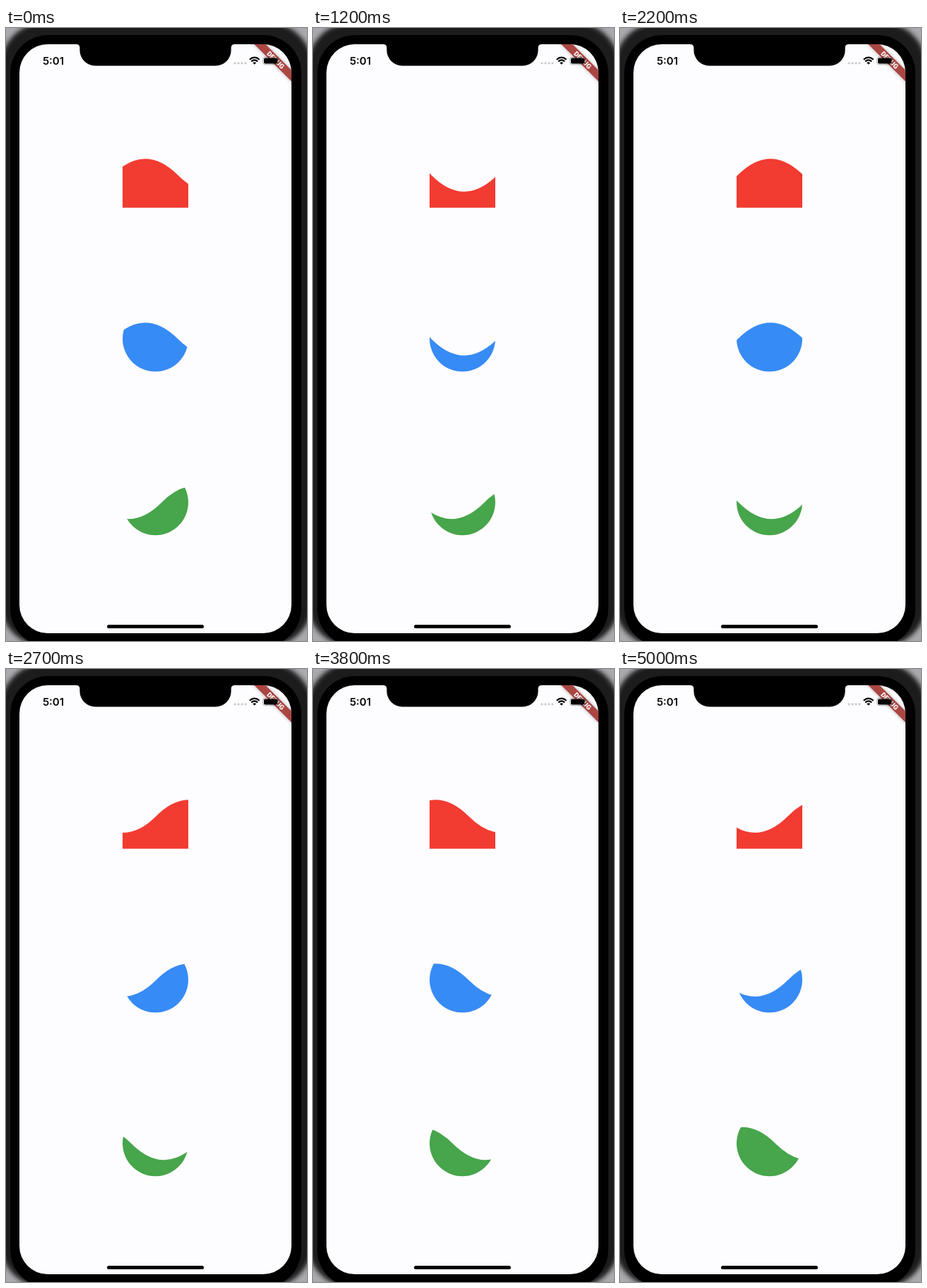
These frames come from a looping animation (426x868 px, 5.1 s). An HTML page:

```html
<!DOCTYPE html>
<html lang="en">
<head>
<meta charset="utf-8">
<title>Wave shapes</title>
<style>
  html, body { margin: 0; width: 100%; height: 100%; overflow: hidden; background: #aaaaae; }
  svg { display: block; width: 426px; height: 868px; }
</style>
</head>
<body>
<svg viewBox="0 0 426 868" xmlns="http://www.w3.org/2000/svg">
  <defs>
    <clipPath id="screen"><rect x="19" y="23" width="385" height="834" rx="40"/></clipPath>
    <clipPath id="square"><rect x="165" y="161.5" width="93" height="93"/></clipPath>
    <clipPath id="discA"><circle cx="211.5" cy="440" r="46.5"/></clipPath>
    <clipPath id="discB"><circle cx="211.5" cy="671.7" r="46.5"/></clipPath>
    <filter id="blur" x="-50%" y="-50%" width="200%" height="200%"><feGaussianBlur stdDeviation="2.6"/></filter>
    <filter id="soft" x="-10%" y="-10%" width="120%" height="120%"><feGaussianBlur stdDeviation="3"/></filter>
  </defs>

  <!-- phone body -->
  <rect x="-8" y="-8" width="442" height="884" rx="64" fill="#1b1b1b" filter="url(#soft)"/>
  <rect x="6" y="10" width="412" height="866" rx="54" fill="#000"/>
  <rect x="19" y="23" width="385" height="834" rx="40" fill="#fdfcff"/>

  <g clip-path="url(#screen)">
    <g transform="translate(404 23) rotate(45)">
      <rect x="-60" y="26" width="120" height="11.2" fill="#000" opacity=".32" filter="url(#blur)"/>
      <rect x="-60" y="26" width="120" height="11.2" fill="#ab4642"/>
      <text x="0" y="35" text-anchor="middle" fill="#fff" font-family="Roboto, sans-serif" font-weight="900" font-size="9.5">DEBUG</text>
    </g>
  </g>
  <path d="M99 22V23Q104.4 23 104.4 28V31.4A22 22 0 0 0 126.4 53.4H296.6A22 22 0 0 0 318.6 31.4V28Q318.6 23 324 23V22Z" fill="#000"/>

  <!-- status bar -->
  <text x="67" y="52" text-anchor="middle" font-family="Inter, sans-serif" font-weight="600" font-size="15" fill="#050505">5:01</text>
  <g fill="#c8c8cc">
    <circle cx="324" cy="49.8" r="1.6"/><circle cx="329" cy="49.8" r="1.6"/>
    <circle cx="334" cy="49.8" r="1.6"/><circle cx="339" cy="49.8" r="1.6"/>
  </g>
  <g fill="none" stroke="#000" stroke-width="2.2">
    <path d="M344.8 44.8Q351.7 38.6 358.6 44.8"/>
    <path d="M347.2 47.4Q351.7 43.4 356.2 47.4"/>
  </g>
  <path d="M349.3 49.3Q351.7 47.2 354.1 49.3L351.7 51.8Z" fill="#000"/>
  <rect x="363.7" y="41.2" width="22" height="10.6" rx="3" fill="none" stroke="#000" stroke-opacity=".35" stroke-width=".9"/>
  <rect x="365" y="42.5" width="19.4" height="8" rx="1.8" fill="#000"/>
  <path d="M387 44.7Q388.6 46.5 387 48.3Z" fill="#000" opacity=".4"/>

  <path id="red" clip-path="url(#square)" fill="#f23b31"/>
  <path id="blue" clip-path="url(#discA)" fill="#378bf5"/>
  <path id="green" clip-path="url(#discB)" fill="#47a54b"/>

  <rect x="143" y="845" width="137" height="5" rx="2.5" fill="#000"/>
</svg>
<script>
  const LOOP = 5100, STEP = 100;
  const LEFT = 165, SIZE = 93, HALF = SIZE / 2, WAVE = SIZE * 2;

  // Speeds in px per second; crest is the offset from the left edge at time 0.
  const shapes = [
    { id: "red", mid: 208.4, crest: 32, speed: 91.8 },
    { id: "blue", mid: 440.4, crest: 32, speed: 91.8 },
    { id: "green", mid: 671.9, crest: 101.6, speed: 18.6 }
  ].map(s => ({ ...s, el: document.getElementById(s.id) }));

  function wavePath(mid, crest) {
    const start = LEFT + crest % WAVE - HALF - WAVE;
    const arcs = `q${HALF} ${-HALF} ${SIZE} 0q${HALF} ${HALF} ${SIZE} 0`.repeat(3);
    return `M${start} ${mid}${arcs}v${SIZE}H${start}Z`;
  }

  function draw(ms) {
    const sec = Math.floor(ms / STEP) * STEP / 1000;
    for (const s of shapes) {
      s.el.setAttribute("d", wavePath(s.mid, s.crest + s.speed * sec));
    }
  }

  const origin = performance.now();
  function tick() {
    draw((performance.now() - origin) % LOOP);
    requestAnimationFrame(tick);
  }
  tick();
</script>
</body>
</html>
```
